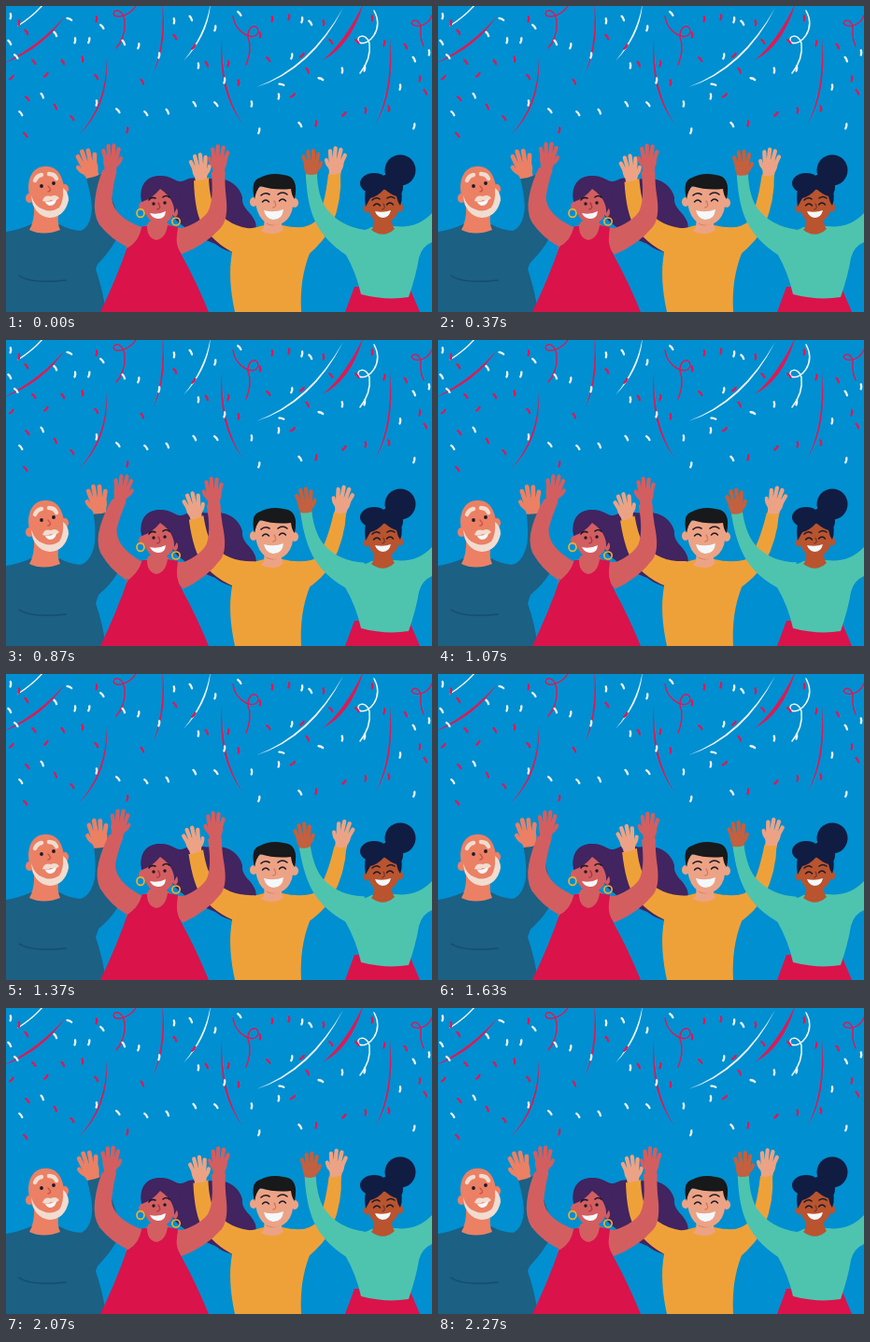
Write an HTML page with a canvas that moves like this. It is 456 by 328 pixels and loops after 2.3 s.

```html
<!DOCTYPE html>
<html lang="en">
<head>
<meta charset="utf-8">
<title>Celebration</title>
<style>
  html, body { margin: 0; width: 100%; height: 100%; overflow: hidden; background: #008fd0; }
  canvas { display: block; width: 456px; height: 328px; }
</style>
</head>
<body>
<canvas id="stage" width="456" height="328"></canvas>
<script>
const ctx = document.getElementById('stage').getContext('2d');
const LOOP = 2300;
const SKY = '#008fd0', PINK = '#df1855', WHITE = '#f3f8fa', INK = '#171a2b';
const NAVY = '#1c6084', PEACH = '#eb8064', BEARD = '#f1dccf';
const ROSE = '#d35e60', RED = '#da134a', PURPLE = '#412460', GOLD = '#efb02f';
const ORANGE = '#efa139', TAN = '#eca385', TEAL = '#4ec4af', BROWN = '#b9542f';
const MIDNIGHT = '#111c43', CLAY = '#c2603f';

const fill = (color, d) => { ctx.fillStyle = color; ctx.fill(new Path2D(d)); };

function stroke(color, width, d) {
  ctx.strokeStyle = color;
  ctx.lineWidth = width;
  ctx.stroke(new Path2D(d));
}

function oval(color, x, y, rx, ry = rx, tilt = 0) {
  ctx.fillStyle = color;
  ctx.beginPath();
  ctx.ellipse(x, y, rx, ry, tilt, 0, Math.PI * 2);
  ctx.fill();
}

function ring(color, width, x, y, rx, ry = rx) {
  ctx.strokeStyle = color;
  ctx.lineWidth = width;
  ctx.beginPath();
  ctx.ellipse(x, y, rx, ry, 0, 0, Math.PI * 2);
  ctx.stroke();
}

function turned(x, y, degrees, draw) {
  ctx.save();
  ctx.translate(x, y);
  ctx.rotate(degrees * Math.PI / 180);
  ctx.translate(-x, -y);
  draw();
  ctx.restore();
}

// 0 at rest, 1 when the arm is fully swung at the peak time
const swing = (t, peak) => (1 + Math.cos((t - peak) / LOOP * Math.PI * 2)) / 2;

// Open palm standing on its wrist; thumb is 1 (right) or -1 (left)
function hand(color, x, y, tilt, thumb, size = 1) {
  ctx.save();
  ctx.translate(x, y);
  ctx.rotate(tilt * Math.PI / 180);
  ctx.scale(thumb * size, size);
  fill(color, 'M-6 4 L-6.5 -4 Q-9 -9 -8 -15 Q0 -19 7.5 -14 Q9 -8 6.5 -3 L6 4Z');
  stroke(color, 4.3, 'M-6 -13 L-8.6 -21 M-2.2 -14 L-3.7 -26.5 M2 -14 L2.2 -27.5 M5.7 -13 L7.6 -24');
  stroke(color, 4, 'M4.5 -6 Q9 -8 10.6 -14');
  ctx.restore();
}

// A ribbon tapering to both ends along a quadratic curve
function ribbon(color, x0, y0, cx, cy, x1, y1, width) {
  const dx = x1 - x0, dy = y1 - y0, len = Math.hypot(dx, dy);
  const nx = -dy / len * width, ny = dx / len * width;
  fill(color, `M${x0} ${y0} Q${cx + nx} ${cy + ny} ${x1} ${y1} Q${cx - nx} ${cy - ny} ${x0} ${y0}Z`);
}

const confetti = [
  { color: WHITE, lean: 12, spots: [74,37, 180,16, 234,80, 142,43, 97,104, 206,64, 224,24, 306,54,
    263,105, 292,97, 271,134, 317,15, 360,69, 422,87, 437,129, 384,67, 453,50, 164,53, 89,37, 5,11] },
  { color: WHITE, lean: -28, spots: [4,39, 11,54, 53,30, 39,96, 16,115, 103,22, 126,39, 198,13,
    250,8, 150,115, 173,113, 202,105, 225,105, 326,18, 437,57, 315,127, 120,112] },
  { color: WHITE, lean: -62, spots: [337,78, 295,84, 68,14] },
  { color: PINK, lean: -28, spots: [22,28, 30,60, 61,60, 53,108, 71,120, 23,99, 146,81, 215,62,
    281,57, 348,38, 428,43, 449,92, 21,138, 97,76, 323,69, 181,33, 376,38] },
  { color: PINK, lean: 8, spots: [14,18, 82,57, 97,14, 130,133, 249,82, 272,31, 303,12, 332,126,
    340,18, 392,13, 405,40, 443,78, 410,110, 385,112, 238,62, 285,14] },
  { color: PINK, lean: 52, spots: [6,77, 201,44, 317,53, 307,96, 362,116, 43,74] }
];

function drawSky() {
  ctx.fillStyle = SKY;
  ctx.fillRect(0, 0, 456, 328);

  ribbon(PINK, 63, 11, 37, 45, -4, 62, 2.6);
  ribbon(PINK, 108, 55, 109, 108, 77, 139, 1.8);
  ribbon(PINK, 167, -4, 172, 37, 158, 72, 1.8);
  ribbon(WHITE, 219, -3, 215, 31, 190, 59, 1.8);
  ribbon(PINK, 231, 34, 228, 91, 253, 126, 2);
  ribbon(WHITE, 361, 2, 326, 67, 268, 87, 2);
  ribbon(PINK, 383, -4, 366, 41, 339, 58, 4);
  ribbon(PINK, 411, 34, 415, 91, 396, 126, 1.8);
  stroke(WHITE, 1.4, 'M40 -2 Q29 11 13 21');
  stroke(PINK, 1.4, 'M140 -2 C134 10 117 15 115 8 C116 2 126 4 127 17 Q128 34 118 45');
  stroke(PINK, 1.4, 'M243 11 C246 31 268 39 270 27 C269 18 259 21 259 33 Q264 47 257 63');
  stroke(WHITE, 1.5, 'M394 5 C405 25 388 44 378 39 C373 32 386 28 389 40 Q391 57 379 72');
  stroke(PINK, 1.4, 'M456 10 C451 23 436 24 434 18 C437 12 445 17 444 26 Q443 35 447 43');

  for (const { color, lean, spots } of confetti) {
    for (let i = 0; i < spots.length; i += 2) {
      const x = spots[i], y = spots[i + 1];
      turned(x, y, lean + Math.sin(i * 2.3) * 7, () =>
        stroke(color, 2.3, `M${x - .5} ${y - 2.5} Q${x + .7} ${y} ${x} ${y + 2.5}`));
    }
  }
}

function drawElder(t) {
  turned(80, 237, 10 * swing(t, 1150), () => {
    hand(PEACH, 93, 184, -18, -1, 1.1);
    fill(NAVY, 'M86 185 Q94 184 102 180 Q107 189 113 205 Q121 226 122 239 Q119 255 96 279 L70 255 L77 242 Q91 239 92 216 Q91 201 86 185Z');
  });
  fill(NAVY, 'M0 242 Q17 239 27 234 L57 234 Q69 241 82 241 Q108 255 96 282 Q103 302 107 328 L0 328Z');
  stroke('#164d6e', 1.5, 'M14 289 Q26 298 64 294');

  fill(PEACH, 'M30 212 Q31 230 25 240 Q40 247 58 240 Q54 232 57 218Z');
  oval(PEACH, 25, 206, 4, 5);
  oval(PEACH, 63, 196, 4, 5);
  fill(PEACH, 'M24 193 C25 178 33 171 44 172 C57 173 61 184 63 199 C65 214 59 224 47 225 C34 225 24 212 24 193Z');
  fill(BEARD, 'M27 203 Q31 216 40 218 Q48 222 57 216 Q62 209 61 195 Q67 199 67 208 Q63 226 47 227 Q29 225 27 203Z');
  fill(BEARD, 'M39 209 Q41 202 48 204 Q54 201 57 206 Q53 210 48 208 Q44 211 39 209Z');
  fill(WHITE, 'M42 210 Q49 210 54 207 Q53 214 47 214 Q43 213 42 210Z');
  stroke(BEARD, 4.5, 'M31 187 Q33 182 38 181 M46 180 Q52 180 54 185');
  oval(INK, 38, 193, 1.9);
  oval(INK, 51, 190, 1.9);
  stroke('#c95448', 1.4, 'M45 193 Q50 198 45 199');
}

function drawLongHair() {
  fill(PURPLE, 'M145 208 C142 190 153 181 166 182 C180 182 181 191 191 187 C201 181 212 187 220 185 C237 183 250 192 253 205 C252 218 263 220 267 232 C269 240 268 253 266 265 C249 268 234 263 224 255 C213 250 197 246 190 236 C179 230 174 215 161 200Z');
}

function smilingEye(x, y) {
  stroke(INK, 1.4, `M${x - 3.5} ${y + 1} Q${x} ${y - 3} ${x + 3.5} ${y + 1}`);
}

function drawYoungMan(t) {
  const p = swing(t, 1150);
  turned(250, 238, -7.2 * p, () => {
    hand(TAN, 209, 187, -7, 1);
    fill(ORANGE, 'M201 187 Q209 188 217 184 Q218 208 224 217 Q238 237 266 239 L252 268 Q227 259 211 236 Q202 222 201 187Z');
  });
  turned(308, 238, 7.2 * p, () => {
    hand(TAN, 352, 180, 6, -1);
    fill(ORANGE, 'M345 180 Q351 182 358 179 Q360 207 349 235 Q342 251 322 268 L298 239 Q323 239 332 230 Q341 216 345 180Z');
  });
  fill(ORANGE, 'M246 240 Q264 239 276 235 L296 235 Q311 239 327 236 Q332 248 325 265 Q314 293 316 328 L245 328 Q237 292 242 264Z');
  fill(TAN, 'M277 224 L276 238 Q273 240 273 241 Q285 248 297 240 L295 236 L295 224Z');
  stroke('#d9815f', 1.3, 'M279 233 Q286 237 294 232');
  oval(TAN, 265, 210, 4, 5);
  oval(TAN, 309, 211, 4, 5);
  fill(TAN, 'M266 197 Q286 185 308 197 Q310 234 287 235 Q266 233 266 197Z');
  fill('#17191b', 'M266 207 Q261 187 272 184 Q283 178 297 181 Q314 182 309 207 Q306 204 305 196 Q288 198 272 193 Q268 197 266 207Z');
  stroke(INK, 1.6, 'M273 203 Q277 199 282 202 M291 202 Q296 198 301 202');
  smilingEye(278, 209);
  smilingEye(296, 208);
  stroke('#d87964', 1.4, 'M287 209 Q291 215 286 216');
  fill(WHITE, 'M276 219 Q287 222 297 218 Q296 229 286 229 Q278 228 276 219Z');
}

function drawRedDress(t) {
  const p = swing(t, 970);
  fill(ROSE, 'M139 242 Q151 238 153 231 L171 229 Q172 237 190 238 L188 263 L128 260Z');
  fill(RED, 'M146 236 L151 236 Q151 249 161 251 Q171 249 173 235 L184 237 Q181 255 188 267 Q203 294 217 328 L101 328 Q119 290 130 258 Q141 250 146 236Z');
  turned(142, 239, 9.5 * p, () => {
    hand(ROSE, 111, 177, 3, 1);
    fill(ROSE, 'M103 176 L118 177 Q114 193 113 207 Q115 226 145 237 Q143 252 131 259 Q113 251 100 235 Q93 224 95 207 Q97 191 103 176Z');
  });
  turned(202, 245, -4.6 * p, () => {
    hand(ROSE, 228, 178, 3, -1);
    fill(ROSE, 'M220 178 L235 178 Q234 190 236 207 Q238 229 230 238 Q214 256 188 266 Q179 254 185 239 Q207 233 216 221 Q223 208 220 178Z');
  });

  oval(ROSE, 146, 215, 4, 5);
  oval(ROSE, 181, 221, 3, 5);
  ring(GOLD, 1.7, 144, 222, 4, 4.4);
  ring(GOLD, 1.7, 182, 231, 4.2, 4);
  fill(ROSE, 'M147 207 Q151 193 166 193 Q182 200 181 216 Q178 233 163 235 Q147 230 147 207Z');
  fill(PURPLE, 'M145 210 Q143 190 156 184 Q175 178 184 195 Q188 211 180 222 Q181 207 165 196 Q156 207 145 210Z');
  stroke(INK, 1.6, 'M153 208 Q155 204 160 206 M168 205 Q171 202 175 205');
  oval(INK, 158, 212, 1.7);
  oval(INK, 170, 211, 1.7);
  stroke('#a93549', 1.4, 'M163 211 Q167 217 162 218');
  fill(WHITE, 'M154 222 Q163 224 171 220 Q170 229 162 228 Q156 227 154 222Z');
}

function drawTealTop(t) {
  fill(RED, 'M373 301 L363 328 L443 328 Q437 314 432 302Z');
  turned(370, 241, -7.2 * swing(t, 1230), () => {
    hand(CLAY, 327, 182, 0, 1, .98);
    fill(TEAL, 'M321 180 Q327 182 333 180 Q334 205 343 217 Q357 236 384 240 L374 273 Q343 256 331 231 Q322 212 321 180Z');
  });
  fill(TEAL, 'M371 240 Q384 242 391 237 L416 236 Q440 239 456 222 L456 253 Q445 258 442 270 Q439 289 431 312 Q407 316 380 309 Q375 286 363 265Z');
  fill(BROWN, 'M394 227 Q395 236 391 240 Q404 250 416 239 Q412 234 413 226Z');

  oval(MIDNIGHT, 422, 176, 16.5);
  oval(MIDNIGHT, 394, 190, 15, 11);
  oval(MIDNIGHT, 411, 194, 14, 14);
  oval(BROWN, 386, 217, 3, 4.5);
  oval(BROWN, 422, 216, 3, 4.5);
  fill(BROWN, 'M387 203 Q403 190 421 203 Q424 230 404 233 Q385 231 387 203Z');
  fill(MIDNIGHT, 'M385 215 Q382 197 389 191 Q407 182 421 193 Q426 203 422 214 Q419 210 418 204 Q410 201 405 196 Q398 204 390 206Z');
  stroke(INK, 1.5, 'M392 208 Q396 204 400 207 M408 206 Q412 203 416 206');
  smilingEye(397, 213);
  smilingEye(411, 212);
  stroke('#813520', 1.3, 'M404 212 Q407 217 403 218');
  fill(WHITE, 'M395 220 Q404 222 412 219 Q410 227 403 227 Q397 226 395 220Z');
}

function render(now) {
  const t = now % LOOP;
  ctx.lineCap = ctx.lineJoin = 'round';
  drawSky();
  drawElder(t);
  drawLongHair();
  drawYoungMan(t);
  drawRedDress(t);
  drawTealTop(t);
}

let start;
function frame(now) {
  start ??= now;
  render(Math.max(0, now - start));
  requestAnimationFrame(frame);
}
render(0);
requestAnimationFrame(frame);
</script>
</body>
</html>
```
